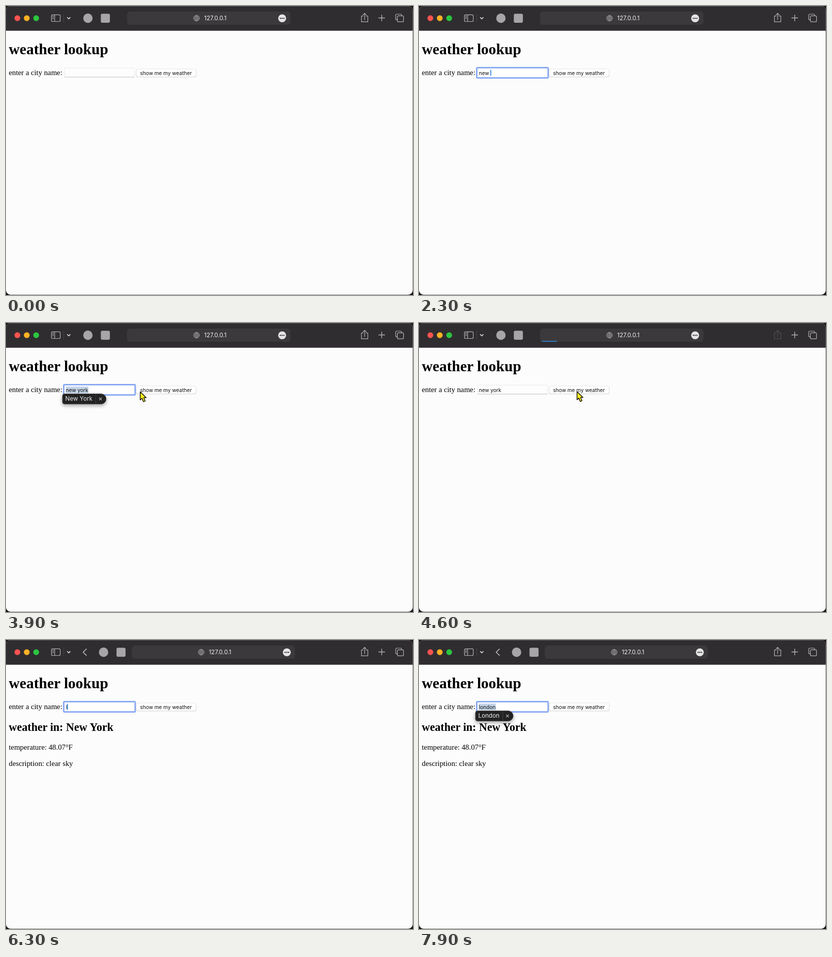
Animation, 800 px wide and 569 px high, one loop 8000 ms. Source, as an HTML page:

```html
<!DOCTYPE html>
<html lang="en">
<head>
<meta charset="utf-8">
<title>weather lookup</title>
<style>
  html, body { margin: 0; width: 100%; height: 100%; overflow: hidden; background: #1a1214; }
  svg { display: block; width: 100vw; height: 100vh; }
  text { white-space: pre; }
  .serif { font-family: "Liberation Serif", "Times New Roman", serif; font-size: 14.75px; fill: #000; }
  .bold { font-weight: 700; }
  .ui { font-family: Inter, sans-serif; font-size: 10.1px; fill: #111; }
  .icon { fill: none; stroke: #b4b2b4; stroke-width: 1.2; stroke-linecap: round; stroke-linejoin: round; }
</style>
</head>
<body>
<svg viewBox="0 0 800 569" xmlns="http://www.w3.org/2000/svg">
  <defs>
    <clipPath id="window"><rect width="799.5" height="568.5" rx="9"/></clipPath>
    <clipPath id="field"><rect x="238" y="11" width="321" height="26" rx="6"/></clipPath>
    <filter id="shadow" x="-30%" y="-40%" width="160%" height="220%">
      <feDropShadow dx="0" dy="3" stdDeviation="3.5" flood-color="#000" flood-opacity=".35"/>
    </filter>
  </defs>

  <g clip-path="url(#window)">
    <rect width="800" height="569" fill="#fcfcfc"/>
    <rect width="800" height="48.7" fill="#302d30"/>
    <rect width="800" height="1" fill="#565356"/>

    <!-- toolbar -->
    <circle cx="22.3" cy="24" r="5.7" fill="#ff5350"/>
    <circle cx="40.8" cy="24" r="5.7" fill="#fdb225"/>
    <circle cx="59.3" cy="24" r="5.7" fill="#2ac63f"/>
    <g class="icon">
      <rect x="89.4" y="17.3" width="17.2" height="13.2" rx="2"/>
      <path d="M95.6 17.5V30.3M91.5 20.2H93.5M91.5 22.5H93.5M91.5 24.8H93.5"/>
      <path d="M113.5 16V32" stroke="#454245" stroke-width="1"/>
      <path d="M120.6 22.6L123.4 25.4L126.2 22.6" stroke="#dddbdd" stroke-width="1.5"/>
      <path id="back" d="M158 17.7L151.6 24L158 30.3" stroke="#c8c6c8" stroke-width="1.5"/>
      <path id="share" d="M702 19.6H698.6V31.2H711.2V19.6H707.8M704.9 27V14.6M701.8 17.5L704.9 14.4L708 17.5"/>
      <path d="M732.6 23.5H744.4M738.5 17.6V29.4" stroke-width="1.4"/>
      <path d="M769 27.3H768A2 2 0 0 1 766 25.3V18A2 2 0 0 1 768 16H775.6A2 2 0 0 1 777.6 18V19"/>
      <rect x="769.4" y="19.4" width="12" height="11.8" rx="2"/>
    </g>
    <g id="extensions" fill="#a7a5a7">
      <circle cx="161" cy="24" r="9.2"/>
      <rect x="186.4" y="15.2" width="17.8" height="17.8" rx="3"/>
    </g>
    <g id="address">
      <rect x="238" y="11" width="321" height="26" rx="6" fill="#3c393c"/>
      <g class="icon" stroke-width=".9" style="stroke-width:.9;stroke:#a09ea0">
        <circle cx="374.5" cy="24" r="5.7"/>
        <ellipse cx="374.5" cy="24" rx="2.7" ry="5.7"/>
        <path d="M374.5 18.3V29.7M368.8 24H380.2M369.8 21H379.2M369.8 27H379.2"/>
      </g>
      <text class="ui" x="411.5" y="28.2" text-anchor="middle" style="font-size:11.6px;fill:#f2f1f2">127.0.0.1</text>
      <circle cx="542.8" cy="24.2" r="7.8" fill="#e6e5e6"/>
      <g fill="#353235">
        <circle cx="539.4" cy="24.2" r="1.2"/><circle cx="542.8" cy="24.2" r="1.2"/><circle cx="546.2" cy="24.2" r="1.2"/>
      </g>
      <g clip-path="url(#field)"><rect id="progress" x="238" y="35.3" height="1.7" fill="#2f86dc"/></g>
    </g>

    <!-- page -->
    <text class="serif bold" x="5.5" y="95" style="font-size:29.5px">weather lookup</text>
    <text class="serif" x="5.5" y="135.7">enter a city name:</text>
    <rect x="115" y="122" width="137.5" height="18.2" fill="#fdfdfd"/>
    <path d="M115.4 140V122.4H252.2V140" fill="none" stroke="#eaeaea" stroke-width=".9"/>
    <path d="M115 140H252.6" stroke="#bdbdbd"/>
    <rect x="255.6" y="124.3" width="118.6" height="16" rx="4" fill="#c9c9c9"/>
    <rect id="button" x="256" y="124" width="117.8" height="15.4" rx="3.8" stroke="#dedede" stroke-width=".7"/>
    <text class="ui" x="263.5" y="135.6">show me my weather</text>
    <rect id="ring" x="113.5" y="121.4" width="140.4" height="20.2" rx="1.5" fill="#fff" stroke="#84a6f2" stroke-width="2.8"/>
    <rect id="selection" x="117.5" y="125" height="13.2" fill="#c5d5e8"/>
    <text id="typed" class="ui" x="117.8" y="135.7"></text>
    <rect id="caret" y="125.6" width="1.5" height="11.8" fill="#1179e0"/>
    <g id="results">
      <text class="serif bold" x="5.5" y="179" style="font-size:22.1px">weather in: New York</text>
      <text class="serif" x="5.5" y="216">temperature: 48.07°F</text>
      <text class="serif" x="5.5" y="247.6">description: clear sky</text>
    </g>

    <!-- spelling bubble -->
    <g id="bubble">
      <path id="bubbleShape" fill="#202020" stroke="#4a4a4a" filter="url(#shadow)"/>
      <text id="bubbleText" class="ui" x="116.6" y="153.2" style="font-size:11.7px;fill:#f0f0f0"></text>
      <g id="bubbleEnd">
        <path d="M0 140V159.5" stroke="#454545"/>
        <path d="M6.5 146.8L11.9 152.2M11.9 146.8L6.5 152.2" stroke="#c4c4c4" stroke-width="1.1"/>
      </g>
    </g>
  </g>

  <!-- pointers, drawn around their hot spots -->
  <g stroke="#1c1a10" stroke-linejoin="round">
    <path id="arrow" d="M0.6 0.6V16.6L4.2 13.3L6.9 20L10.4 18.6L7.6 12H12.3Z" fill="#ffee1c" stroke-width="1.5"/>
    <path id="beam" d="M-5 -9.5H-2L0 -8L2 -9.5H5V-6.8H2.8L1.4 -5.4V-1.4H3.2V1.4H1.4V6.4L2.8 7.8H5V10.5H2L0 9L-2 10.5H-5V7.8H-2.8L-1.4 6.4V1.4H-3.2V-1.4H-1.4V-5.4L-2.8 -6.8H-5Z" fill="#e9da35" stroke-width="1.2"/>
  </g>
</svg>
<script>
const LOOP = 8000;
const $ = id => document.getElementById(id);
const clamp = x => Math.max(0, Math.min(1, x));
const ramp = (t, from, to) => clamp((t - from) / (to - from));
const ease = x => x * x * (3 - 2 * x);
const show = (id, on) => $(id).setAttribute("visibility", on ? "visible" : "hidden");
const set = (id, name, value) => $(id).setAttribute(name, value);
const shift = (id, x, y = 0) => set(id, "transform", `translate(${x} ${y})`);

const pen = document.createElement("canvas").getContext("2d");
function textWidth(text, size) {
  pen.font = `${size}px Inter, sans-serif`;
  return pen.measureText(text).width;
}

// Each visit to the input: focus, key times, bubble and blur.
const visits = [
  { word: "new york", label: "New York", focus: 1400, bubble: 3300, blur: 4200,
    keys: [1800, 1900, 2100, 2200, 2500, 2600, 2800, 3000] },
  { word: "london", label: "London", focus: 5800, bubble: 7700, blur: LOOP,
    keys: [6000, 6500, 6700, 6900, 7100, 7300] }
];
const LOADED = 4800;

const moves = [
  { from: [300, 572], to: [128, 136], start: 250, end: 1050 },
  { from: [128, 136], to: [310, 134.5], start: 3500, end: 4100 },
  { from: [310, 134.5], to: [128, 136], start: 5150, end: 5700 }
];
const hiddenSpans = [[0, 300], [1800, 3500], [6000, LOOP]];

function drawPointer(t) {
  const move = moves.filter(m => t >= m.start).pop() || moves[0];
  const k = ease(ramp(t, move.start, move.end));
  const [x, y] = move.from.map((a, i) => a + (move.to[i] - a) * k);
  const visible = !hiddenSpans.some(([a, b]) => t >= a && t < b);
  const overInput = x > 114 && x < 253 && y > 121 && y < 141;
  show("arrow", visible && !overInput);
  show("beam", visible && overInput);
  shift("arrow", x, y);
  shift("beam", x, y);
}

function drawInput(t) {
  const visit = visits.filter(v => t >= v.focus).pop();
  const focused = !!visit && t < visit.blur;
  const pressed = visit ? visit.keys.filter(k => t >= k) : [];
  const text = visit && (focused || t < LOADED) ? visit.word.slice(0, pressed.length) : "";
  const width = textWidth(text, 10.1);
  $("typed").textContent = text;

  show("ring", focused);
  if (focused) set("ring", "opacity", ramp(t, visit.focus - 100, visit.focus + 150));

  const since = focused ? t - (pressed.length ? pressed[pressed.length - 1] : visit.focus) : 0;
  show("caret", focused && Math.floor(since / 500) % 2 === 0);
  set("caret", "x", 117.4 + width + (text ? 0.2 : 0));

  const bubble = focused && t >= visit.bubble;
  show("bubble", bubble);
  show("selection", bubble);
  if (!bubble) return;
  set("selection", "width", width + 0.8);
  const right = 143.6 + textWidth(visit.label, 11.7);
  set("bubbleShape", "d", `M115 139.5H${right - 10}a10 10 0 0 1 0 20H115a4 4 0 0 1 -4 -4V143.5a4 4 0 0 1 4 -4Z`);
  $("bubbleText").textContent = visit.label;
  shift("bubbleEnd", right - 20.5);
}

function drawPage(t) {
  const loaded = t >= LOADED;
  show("back", loaded);
  show("results", loaded);
  shift("extensions", loaded ? 30.8 : 0);
  shift("address", loaded ? 9.2 : 0);
  set("share", "opacity", t >= 4400 && !loaded ? 0.25 : 1);
  set("button", "fill", t >= 4200 && t < 4400 ? "#ececec" : "#fff");
  set("progress", "width", 33 * ramp(t, 4350, 4600) + 288 * ramp(t, 4700, 4900));
  set("progress", "opacity", 1 - ramp(t, 4880, 5000));
}

function draw(now) {
  const t = now % LOOP;
  drawPage(t);
  drawInput(t);
  drawPointer(t);
}

const began = performance.now();
function tick() {
  draw(performance.now() - began);
  requestAnimationFrame(tick);
}
tick();
</script>
</body>
</html>
```
